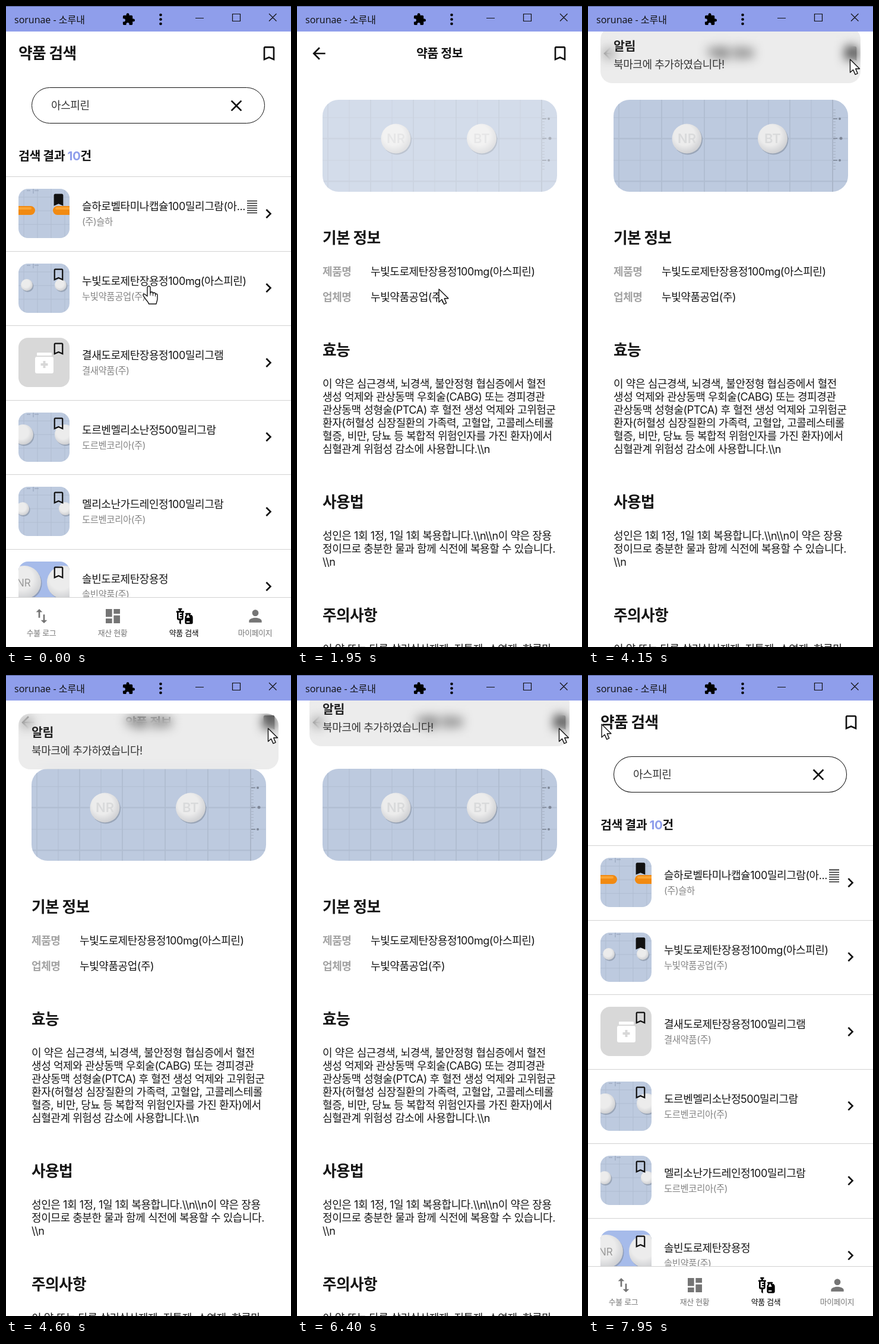
Animation, 480 px wide and 1080 px high, one loop 8000 ms. Source, as an HTML page:

```html
<!DOCTYPE html>
<html lang="ko">
<head>
<meta charset="utf-8">
<title>약품 검색</title>
<style>
html, body { margin: 0; width: 100%; height: 100%; overflow: hidden; background: #fff; }
#stage { position: relative; width: 480px; height: 1080px; overflow: hidden; background: #fff;
  font-family: Inter, "Noto Sans CJK KR", "Noto Sans CJK", sans-serif; color: #151515; }
#stage div, #stage svg { position: absolute; }
.page, #scrim { inset: 0; transform-origin: 240px 561.5px; }
.page { background: #fff; }
#detail { clip-path: inset(43px 0 0 0); }
#scrim { background: #000; }
.t { white-space: nowrap; line-height: 30px; letter-spacing: -.024em; }
.b { font-weight: 700; }
.mid { transform: translateX(-50%); }
.line { left: 0; width: 480px; height: 1px; background: #d2d2d2; }
.search { left: 43px; top: 137px; width: 391px; height: 59px; border: 1.5px solid #111; border-radius: 31px; }
.thumb { border-radius: 16px; }
#nav { left: 0; top: 996px; width: 480px; height: 84px; background: #fff; }
#photo { left: 43px; top: 158px; border-radius: 27px; }
.hover { top: 43px; width: 94px; height: 74.7px; overflow: hidden; }
.hover::before { content: ""; position: absolute; left: 0; top: -9.5px; width: 94px; height: 94px; border-radius: 50%; background: #f4f4f4; }
#snack { left: 21px; top: 65px; width: 438px; height: 94.5px; border-radius: 20px;
  background: rgba(158,158,158,.2); backdrop-filter: blur(9px); }
#bar { left: 0; top: 0; width: 480px; height: 43px; background: #8f9eeb; border-top: 1px solid #56619a; box-sizing: border-box; }
#bar .t { font-family: "Open Sans", "Noto Sans CJK KR", sans-serif; letter-spacing: 0; }
#cursor { overflow: visible; left: 0; top: 0; }
</style>
</head>
<body>
<div id="stage">
  <div id="list" class="page"></div>
  <div id="scrim"></div>
  <div id="detail" class="page"></div>
  <div id="snack"></div>
  <div id="bar"></div>
  <svg id="cursor" width="1" height="1" fill="#fff" stroke="#111" stroke-width="1.4" stroke-linejoin="round">
    <path id="arrow" d="M0 0V22L5 17.4l3.6 8 4-1.8L9.2 15.8H16z"/>
    <g id="hand"><path d="M-2.5 17V2.5a2.5 2.5 0 0 1 5 0V12c0-3 4.5-3 4.5 0v1c0-2.6 4-2.6 4 0v1.5c0-2 3.5-2 3.5.5v6c0 4-1.5 5-2 9H0c-.5-3-4-6-6-9-1-1.6-3-4-3.5-5.5-.6-2 2-3 4-1z"/><path d="M2.5 12v4M7 13v3.5M11 14.5v3" stroke-width="1"/></g>
  </svg>
</div>
<script>
const $ = id => document.getElementById(id);

const MARK = 'M17 3H7c-1.1 0-1.99.9-1.99 2L5 21l7-3 7 3V5c0-1.1-.9-2-2-2z';
const ICON = {
  saved: MARK,
  mark: MARK + 'm0 15l-5-2.18L7 18V5h10v13z',
  back: 'M20 11H7.83l5.59-5.59L12 4l-8 8 8 8 1.41-1.41L7.83 13H20v-2z',
  close: 'M19 6.41L17.59 5 12 10.59 6.41 5 5 6.41 10.59 12 5 17.59 6.41 19 12 13.41 17.59 19 19 17.59 13.41 12z',
  next: 'M10 6L8.59 7.41 13.17 12l-4.58 4.59L10 18l6-6z',
  swap: 'M16 17.01V10h-2v7.01h-3L15 21l4-3.99h-3zM9 3L5 6.99h3V14h2V6.99h3L9 3z',
  board: 'M3 13h8V3H3v10zm0 8h8v-6H3v6zm10 0h8V11h-8v10zm0-18v6h8V3h-8z',
  vaccine: 'M11 5.5H8V4h.5c.55 0 1-.45 1-1s-.45-1-1-1h-3c-.55 0-1 .45-1 1s.45 1 1 1H6v1.5H3c-.55 0-1 .45-1 1s.45 1 1 1V15c0 1.1.9 2 2 2h1v4l2 1.5V17h1c1.1 0 2-.9 2-2V7.5c.55 0 1-.45 1-1s-.45-1-1-1zM9 9H7.25c-.41 0-.75.34-.75.75s.34.75.75.75H9V12H7.25c-.41 0-.75.34-.75.75s.34.75.75.75H9V15H5V7.5h4V9zm10.5 1.5V10c.55 0 1-.45 1-1s-.45-1-1-1h-5c-.55 0-1 .45-1 1s.45 1 1 1v.5c0 .5-1.5 1.16-1.5 3V20c0 1.1.9 2 2 2h6c1.1 0 2-.9 2-2v-6.5c0-1.84-1.5-2.5-1.5-3zM16.5 10.5V10h1v.5c0 1.6 1.5 2 1.5 3V14h-4v-.5c0-1 1.5-1.4 1.5-3zM15 20v-1.5h4V20h-4z',
  person: 'M12 12c2.21 0 4-1.79 4-4s-1.79-4-4-4-4 1.79-4 4 1.79 4 4 4zm0 2c-2.67 0-8 1.34-8 4v2h16v-2c0-2.66-5.33-4-8-4z',
  plug: 'M20.5 11H19V7c0-1.1-.9-2-2-2h-4V3.5C13 2.12 11.88 1 10.5 1S8 2.12 8 3.5V5H4c-1.1 0-1.99.9-1.99 2v3.8H3.5c1.49 0 2.7 1.21 2.7 2.7s-1.21 2.7-2.7 2.7H2V20c0 1.1.9 2 2 2h3.8v-1.5c0-1.49 1.21-2.7 2.7-2.7 1.49 0 2.7 1.21 2.7 2.7V22H17c1.1 0 2-.9 2-2v-4h1.5c1.38 0 2.5-1.12 2.5-2.5S21.88 11 20.5 11z'
};

// x is the left edge (or the middle with class "mid"), y the middle of the line
const text = (x, y, size, str, cls = '', color = '') =>
  `<div class="t ${cls}" style="left:${x}px;top:${y - 15}px;font-size:${size}px;color:${color}">${str}</div>`;
const icon = (name, x, y, size = 32, color = '#111', id = '') =>
  `<svg id="${id}" style="left:${x - size / 2}px;top:${y - size / 2}px" width="${size}" height="${size}" viewBox="0 0 24 24"><path fill="${color}" fill-rule="evenodd" d="${ICON[name]}"/></svg>`;
const line = y => `<div class="line" style="top:${y}px"></div>`;
const disc = (x, y, r) =>
  `<circle cx="${x + 1.5}" cy="${y + 2}" r="${r}" fill="#7d8797" opacity=".55"/><circle cx="${x}" cy="${y}" r="${r}" fill="url(#pill)"/>`;
const ruled = (w, h, step, x0, y0) => {
  let d = '';
  for (let x = x0; x < w; x += step) d += `M${x} 0V${h}`;
  for (let y = y0; y < h; y += step) d += `M0 ${y}H${w}`;
  return `<path d="${d}" stroke="#b0bdd1" fill="none"/>`;
};
const PILL = '<defs><radialGradient id="pill" cx=".42" cy=".38" r=".62"><stop offset=".55" stop-color="#ececec"/><stop offset="1" stop-color="#cfd0d3"/></radialGradient></defs>';

// list page
const pair = (l, r, y, rad) => disc(l, y, rad) + disc(r, y, rad);
const capsule = x => `<rect x="${x}" y="29" width="48" height="15" rx="7.5" fill="#f18a12"/><rect x="${x + 4}" y="31" width="38" height="4" rx="2" fill="#fba535"/>`;
const jar = '<path fill="#fff" d="M32 25h23a1 1 0 0 1 1 1v4H31v-4a1 1 0 0 1 1-1zM31 32h25a3 3 0 0 1 3 3v22a3 3 0 0 1-3 3H31a3 3 0 0 1-3-3V35a3 3 0 0 1 3-3z"/><path d="M43.500 39v12M37.500 45h12" stroke="#d8d8d8" stroke-width="4"/>';
const ROWS = [
  ['슬하로벨타미나캡슐100밀리그람(아...', '(주)슬하', capsule(-20) + capsule(58)],
  ['누빛도로제탄장용정100mg(아스피린)', '누빛약품공업(주)', pair(14, 71, 36, 10)],
  ['결새도로제탄장용정100밀리그램', '결새약품(주)', jar],
  ['도르벤멜리소난정500밀리그람', '도르벤코리아(주)', pair(8, 78, 37, 17)],
  ['멜리소난가드레인정100밀리그람', '도르벤코리아(주)', pair(7, 79, 37, 11)],
  ['솔빈도로제탄장용정', '솔빈약품(주)', pair(10, 76, 35, 28) + '<text x="-3" y="42" font-size="17" fill="#999">NR</text>']
];
const FILL = { 2: '#d8d8d8', 5: '#a6bbea' };

function row([name, maker, art], i) {
  const y = 287 + i * 125.6;
  const base = FILL[i] || '#bdcadf';
  const grid = FILL[i] ? '' : ruled(86, 83, 23, 9, 14) + '<path d="M14 3h6M27 3h7M25 0v8" stroke="#8f9db5" fill="none"/>';
  return line(y) +
    `<svg class="thumb" style="left:21px;top:${y + 21}px;background:${base}" width="86" height="83">${PILL}${grid}${art}</svg>` +
    icon(i ? 'mark' : 'saved', 88, y + 39.5, 27, '#111', 'mark' + i) +
    text(128, y + 51, 18, name) +
    text(128, y + 77, 15.4, maker, '', '#858585') +
    icon('next', 442.3, y + 62.5);
}
const TABS = [['swap', '수불 로그'], ['board', '재산 현황'], ['vaccine', '약품 검색'], ['person', '마이페이지']];
const tab = ([name, label], i) => {
  const color = i === 2 ? '#000' : '#757575';
  return icon(name, 60 + i * 120, 32, 32, color) + text(59.5 + i * 120, 61, 12.9, label, 'mid', color);
};
$('list').innerHTML =
  text(21, 80, 25.7, '약품 검색', 'b') + icon('mark', 442.7, 80) +
  '<div class="search"></div>' + text(76, 168, 18, '아스피린', '', '#333') + icon('close', 388, 168) +
  text(21, 253, 20.6, '검색 결과 <span style="color:#8f9eeb">10</span>건', 'b') +
  ROWS.map(row).join('') +
  '<svg style="left:406px;top:327px" width="17" height="23"><path d="M0 1.500h17M0 5.500h17M0 9.500h17M0 13.500h17M0 17.500h17M0 21.500h17" stroke="#222" stroke-width="1.7"/></svg>' +
  `<div id="nav">${line(0)}${TABS.map(tab).join('')}</div>`;

// detail page
const EFFECT = [
  '이 약은 심근경색, 뇌경색, 불안정형 협심증에서 혈전',
  '생성 억제와 관상동맥 우회술(CABG) 또는 경피경관',
  '관상동맥 성형술(PTCA) 후 혈전 생성 억제와 고위험군',
  '환자(허혈성 심장질환의 가족력, 고혈압, 고콜레스테롤',
  '혈증, 비만, 당뇨 등 복합적 위험인자를 가진 환자)에서',
  String.raw`심혈관계 위험성 감소에 사용합니다.\\n`
];
const USAGE = [
  String.raw`성인은 1회 1정, 1일 1회 복용합니다.\\n\\n이 약은 장용`,
  '정이므로 충분한 물과 함께 식전에 복용할 수 있습니다.',
  String.raw`\\n`
];
const CAUTION = ['이 약 또는 다른 살리실산제제, 진통제, 소염제, 항류마'];
const section = (y, title, lines) => text(43, y, 25.7, title, 'b') +
  lines.map((s, i) => text(43, y + 57 + i * 22, 18, s)).join('');
const field = (y, label, value) => text(43, y, 18, label, 'b', '#a3a3a3') + text(124, y, 18, value);

let ticks = 'M369 0V155';
for (let y = 17; y < 120; y += 5) ticks += `M370 ${y}h4`;
const photo = `<svg id="photo" width="394.500" height="155" style="background:#bdcadf">${PILL}` +
  ruled(394.5, 155, 36, 45, 30) + '<g opacity=".7" stroke-width="2">' + ruled(394.5, 155, 72, 9, 65) + '</g>' +
  `<path d="${ticks}" stroke="#a3aebf"/><path d="M370 32h7M370 65h7M370 102h7" stroke="#7d8696" stroke-width="1.5"/>` +
  '<g fill="#7d8696"><circle cx="381" cy="32" r="2"/><circle cx="383" cy="65" r="2.500"/><circle cx="381" cy="102" r="2"/></g>' +
  disc(123.5, 65.5, 25) + disc(268, 65.5, 25) +
  '<g fill="#d9dadb" font-size="22" font-weight="600" text-anchor="middle"><text x="123.500" y="73">NR</text><text x="268" y="73">BT</text></g></svg>';

$('detail').innerHTML =
  '<div id="overBack" class="hover" style="left:-10px"></div><div id="overMark" class="hover" style="left:395.700px"></div>' +
  icon('back', 37.3, 80) + text(240, 80, 20.6, '약품 정보', 'b mid') + icon('mark', 442.7, 80, 32, '#111', 'pageMark') +
  photo + text(43, 391, 25.7, '기본 정보', 'b') +
  field(448, '제품명', '누빛도로제탄장용정100mg(아스피린)') + field(490.5, '업체명', '누빛약품공업(주)') +
  section(580, '효능', EFFECT) + section(836, '사용법', USAGE) + section(1027, '주의사항', CAUTION);

$('snack').innerHTML = text(22, 32, 20.6, '알림', 'b', '#222') + text(22, 63, 18, '북마크에 추가하였습니다!', '', '#333');

$('bar').innerHTML = text(14, 22, 16, 'sorunae - 소루내', '', '#111') + icon('plug', 206, 21, 23, '#000') +
  '<svg style="left:240px;top:0" width="240" height="42"><g fill="#000"><circle cx="20.500" cy="14" r="2.300"/><circle cx="20.500" cy="21.500" r="2.300"/><circle cx="20.500" cy="29" r="2.300"/></g>' +
  '<path d="M79 19.500h14M141.500 12.500h13v12h-13zM203 12l12.500 12.500M215.500 12L203 24.500" fill="none" stroke="#111" stroke-width="1.200"/></svg>';

// motion
const LOOP = 8000, STEP = 50, PUSH = 1000, SAVE = 3450, POP = 7680, ZOOM = 300;
const SHOW = 3500, HIDE = 6000, SLIDE = 466;
const clamp = v => Math.min(1, Math.max(0, v));
const part = (t, a, b) => clamp((t - a) / (b - a));

function bezier(x1, y1, x2, y2, x) {
  const at = (a, b, s) => 3 * (1 - s) ** 2 * s * a + 3 * (1 - s) * s * s * b + s ** 3;
  let lo = 0, hi = 1;
  for (let i = 0; i < 24; i++) {
    const s = (lo + hi) / 2;
    if (at(x1, x2, s) < x) lo = s; else hi = s;
  }
  return at(y1, y2, hi);
}
const zoomCurve = p => p >= 1 ? 1 : p < 1 / 6
  ? .4 * bezier(.05, 0, .1333, .06, p * 6)
  : .4 + .6 * bezier(.2083, .82, .25, 1, (p - 1 / 6) * 1.2);
const outCirc = p => Math.sqrt(1 - (p - 1) ** 2);

// time, x, y
const PATH = [
  [0, 240.5, 472], [950, 240.5, 472], [1100, 231, 471], [1700, 231, 471], [1950, 239, 477],
  [2050, 239, 477], [2550, 440, 91], [2700, 447, 88], [3500, 447, 88], [3900, 441.5, 90],
  [6450, 441.5, 90], [6800, 445, 89], [7050, 48, 89], [7650, 48, 89], [7900, 23, 83], [LOOP, 23, 83]
];
function cursorAt(t) {
  const i = PATH.findIndex(k => k[0] > t);
  const [a, x, y] = PATH[i - 1], [b, x2, y2] = PATH[i];
  const p = part(t, a, b), e = p * p * (3 - 2 * p);
  return [x + (x2 - x) * e, y + (y2 - y) * e];
}

const scale = (el, s) => el.style.transform = s === 1 ? 'none' : `scale(${s})`;
const show = (el, on) => el.style.display = on ? '' : 'none';
const setMark = (id, on) => $(id).firstChild.setAttribute('d', on ? ICON.saved : ICON.mark);

function render(t) {
  const popping = t >= POP;
  const p = popping ? part(t, POP, POP + ZOOM) : part(t, PUSH, PUSH + ZOOM);
  const z = zoomCurve(p);
  scale($('list'), popping ? 1.1 - .1 * z : 1 + .05 * z);
  scale($('detail'), popping ? 1 - .1 * z : .85 + .15 * z);
  const seen = popping ? 1 - part(p, .0825, .2075) : part(p, .125, .25);
  $('detail').style.opacity = seen;
  show($('detail'), seen > 0);
  $('scrim').style.opacity = popping ? 0 : .6 * part(p, .2075, .4175);
  $('photo').style.opacity = bezier(.42, 0, 1, 1, part(t, 1565, 2065));

  const saved = t >= SAVE;
  setMark('pageMark', saved);
  setMark('mark1', saved);

  const slide = t < HIDE ? part(t, SHOW, SHOW + 1000) : 1 - part(t, HIDE, HIDE + 1000);
  const lift = SLIDE * (1 - outCirc(slide));
  $('snack').style.top = 65 - lift + 'px';
  show($('snack'), lift < 120);

  const [x, y] = cursorAt(t);
  const onDetail = t >= PUSH && !popping;
  const near = cx => onDetail && 159.5 - lift < y && Math.hypot(x - cx, y - 80) < 37;
  const overBack = near(37), overMark = near(442.7);
  const overRow = !onDetail && y > 287 && y < 996;
  show($('overBack'), overBack);
  show($('overMark'), overMark);
  const hand = overBack || overMark || overRow;
  show($('hand'), hand);
  show($('arrow'), !hand);
  $('cursor').style.transform = `translate(${x}px,${y}px)`;
}

const start = performance.now();
function tick() {
  const t = (performance.now() - start) % LOOP;
  render(Math.floor(t / STEP) * STEP);
  requestAnimationFrame(tick);
}
render(0);
requestAnimationFrame(tick);
</script>
</body>
</html>
```
